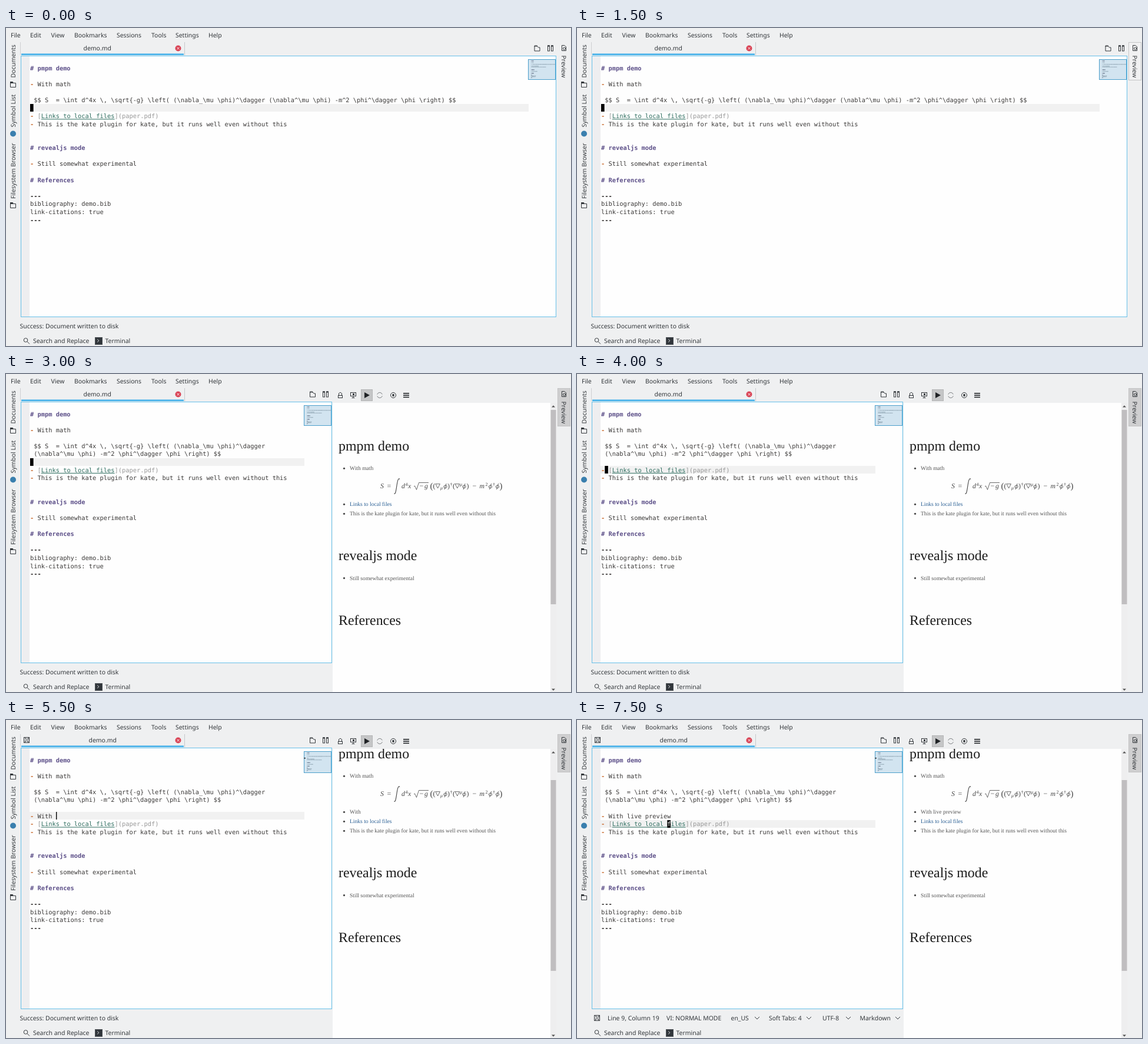
Animation, 960 px wide and 540 px high, one loop 8 s. Source, as an HTML page with a canvas:

```html
<!DOCTYPE html>
<html>
<head>
<meta charset="utf-8">
<style>
html, body { margin: 0; width: 100%; height: 100%; overflow: hidden; background: #eff0f1; }
canvas { display: block; }
</style>
</head>
<body>
<canvas id="stage" width="960" height="540"></canvas>
<script>
const ctx = document.getElementById('stage').getContext('2d');
const UI = '10.45px "Noto Sans", sans-serif';
const MONO = '10.37px "DejaVu Sans Mono", monospace';
const SERIF = '"Liberation Serif", serif';
const INK = '#33373b', BLUE = '#3daee9';
const CHAR = 6.243, ROW = 13.58, LEFT = 41, TOP = 68;
const TYPED = ['', '- ', '- With ', '- With live p', '- With live previe', '- With live preview'];
const SHOWN = ['With', 'With liv', 'With live prev', 'With live preview'];
const MATH_A = ' $$ S  = \\int d^4x \\, \\sqrt{-g} \\left( (\\nabla_\\mu \\phi)^\\dagger';
const MATH_B = '(\\nabla^\\mu \\phi) -m^2 \\phi^\\dagger \\phi \\right) $$';
const HEAD = ['# pmpm demo', '', '- With math', ''];
const TAIL = ['- [Links to local files](paper.pdf)',
  '- This is the kate plugin for kate, but it runs well even without this', '', '',
  '# revealjs mode', '', '- Still somewhat experimental', '', '# References', '',
  '---', 'bibliography: demo.bib', 'link-citations: true', '---'];

function text(s, x, y, color = INK, font = UI) {
  ctx.font = font;
  ctx.fillStyle = color;
  ctx.fillText(s, x, y);
}
function box(x, y, w, h, fill, stroke) {
  if (fill) { ctx.fillStyle = fill; ctx.fillRect(x, y, w, h); }
  if (stroke) { ctx.strokeStyle = stroke; ctx.lineWidth = 1; ctx.strokeRect(x + .5, y + .5, w - 1, h - 1); }
}
function line(points, color = INK, width = 1) {
  ctx.beginPath();
  for (let i = 0; i < points.length; i += 2) ctx.lineTo(points[i], points[i + 1]);
  ctx.strokeStyle = color;
  ctx.lineWidth = width;
  ctx.stroke();
}
function circle(x, y, r, fill, stroke) {
  ctx.beginPath();
  ctx.arc(x, y, r, 0, 7);
  if (fill) { ctx.fillStyle = fill; ctx.fill(); }
  if (stroke) { ctx.strokeStyle = stroke; ctx.lineWidth = 1; ctx.stroke(); }
}
function at(x, y, draw, angle = 0) {
  ctx.save();
  ctx.translate(x, y);
  ctx.rotate(angle);
  draw();
  ctx.restore();
}
const chevron = x => line([x - 4, 504, x, 508, x + 4, 504]);

const icons = {
  page() {
    line([0, -3.5, -4.5, -3.5, -4.5, 4.5, 4.5, 4.5, 4.5, -1.5, 2, -1.5, 0, -3.5, 0, -4.5, -4.5, -4.5, -4.5, -3]);
  },
  split() {
    box(-5, -5, 4, 10, null, INK);
    box(1, -5, 4, 10, null, INK);
    box(-5, -5, 4, 2, INK);
    box(1, -5, 4, 2, INK);
  },
  folder() {
    line([-4.5, -4.5, -.5, -4.5, .5, -2.5, 4.5, -2.5, 4.5, 4.5, -4.5, 4.5, -4.5, -5]);
    box(-4, -4, 4, 2, INK);
  },
  preview() {
    line([1, -4.5, -3.5, -4.5, -3.5, 4.5, 3.5, 4.5, 3.5, -2, 1, -4.5]);
    circle(.5, 1, 2, null, INK);
  },
  lock() {
    box(-4, 0, 8, 5, null, INK);
    line([-2.5, 0, -2.5, -3, -1, -4.5, 1, -4.5, 2.5, -3, 2.5, 0]);
  },
  screen() {
    box(-5, -5, 10, 7, null, INK);
    line([0, 2, 0, 5]);
    line([-2.5, 4.5, 2.5, 4.5]);
    box(-1, -3, 3, 3, INK);
  },
  play() {
    box(-10, -10, 20, 20, '#c5c6c7', '#b4b5b6');
    ctx.beginPath();
    ctx.moveTo(-4, -5); ctx.lineTo(5, 0); ctx.lineTo(-4, 5);
    ctx.fillStyle = '#202326';
    ctx.fill();
  },
  refresh() {
    for (const a of [.3, 3.44]) {
      ctx.beginPath();
      ctx.arc(0, 0, 4.5, a, a + 2.5);
      ctx.strokeStyle = '#777a7d';
      ctx.lineWidth = 1;
      ctx.stroke();
    }
  },
  stop() { circle(0, 0, 4.5, null, INK); box(-1.5, -2, 3, 4, INK); },
  menu() { for (const y of [-4, -.7, 2.6]) box(-5, y, 10, 1.6, '#202326'); },
  save() {
    box(-5, -5, 10, 10, null, INK);
    box(-2.5, -5, 6, 4, null, INK);
    box(-3, 1, 6, 4, null, INK);
  }
};
const icon = (name, x, y) => at(x, y, icons[name]);

function codeLine(s, row) {
  const y = TOP + row * ROW + 3.5;
  const put = (str, col, color = '#3a3837', bold = '') =>
    text(str, LEFT + col * CHAR, y, color, bold + MONO);
  if (s.startsWith('#')) put(s, 0, '#5c4f88', 'bold ');
  else if (s === '---') put(s, 0, '#1f1c1b', 'bold ');
  else if (s.startsWith('- ')) {
    put('-', 0, '#c8692c', 'bold ');
    const link = s.match(/\[(.*)\](.*)/);
    if (link) {
      const end = 3 + link[1].length;
      put('[', 2, '#979797');
      put(link[1], 3, '#2f6e60');
      box(LEFT + 3 * CHAR, y + 1.4, link[1].length * CHAR, 1, '#2f6e60');
      put(']' + link[2], end, '#979797');
    } else put(s.slice(2), 2);
  } else put(s, 0);
}

function minimap(x, rows, changed) {
  box(x, 53, 47, changed ? 37 : 35, '#d2e4f0', '#4d9fcb');
  rows.forEach((s, i) => {
    const y = 55.3 + i * 1.5;
    const strong = /^(#|---)/.test(s);
    ctx.fillStyle = strong ? '#37405a' : '#6f8290';
    for (let c = 0; c < s.length; c++)
      if (s[c] !== ' ') ctx.fillRect(x + 5.5 + c * .355, y, .3, strong ? 1.2 : .9);
  });
  if (changed) box(x, 64, 3, 1.5, '#30363b');
}

function editor(step, open) {
  const right = open ? 554 : 935;
  const mapX = right - 48;
  const inserted = step >= 9;
  const typed = inserted ? TYPED[Math.min(step - 9, 5)] : '';
  const math = open ? [MATH_A, ' ' + MATH_B] : [MATH_A + ' ' + MATH_B];
  const extra = inserted ? [typed] : [];
  const rows = [...HEAD, ...math, '', ...extra, ...TAIL];

  let row = open ? 6 : 5, col = 0;
  if (step >= 7) { row = 7; col = 1; }
  if (inserted) col = typed.length;
  if (step === 15) { row = 8; col = 18; }
  const insertMode = inserted && step < 15;

  box(25, 47, right - 25, 444, '#fefefe', step === 4 || step === 5 ? '#c3c5c7' : '#66bfe8');
  box(26, 48, 14, 442, '#eeeef0');
  const y = Math.round(TOP + row * ROW - 6.9);
  box(40, y, mapX - 39, 13, '#f1f1f1');
  rows.forEach(codeLine);

  const x = LEFT + col * CHAR;
  if (insertMode) box(Math.round(x), y, 1.4, 13, '#000');
  else {
    box(x, y, 5.6, 13, '#000');
    text((rows[row][col] || '').trim(), x, TOP + row * ROW + 3.5, '#fff', MONO);
  }
  minimap(mapX, ['# pmpm demo', '', '- With math', '', MATH_A + MATH_B, '', ...extra, ...TAIL], inserted);
}

function formula(y) {
  const color = '#444';
  const glyphs = (list, dy, size, style = 'italic ') => {
    for (const [s, x] of list) text(s, x, y + dy, color, style + size + 'px ' + SERIF);
  };
  const nabla = x => line([x, y - 7.3, x + 7.6, y - 7.3, x + 3.8, y, x, y - 7.3], color, .8);
  const phi = x => {
    ctx.beginPath();
    ctx.ellipse(x + 3, y - 2.6, 2.7, 2.4, -.3, 0, 7);
    ctx.strokeStyle = color;
    ctx.lineWidth = .9;
    ctx.stroke();
    line([x + 4.6, y - 8, x + 1.6, y + 2.3], color, .8);
  };
  glyphs([['S', 636], ['d', 672], ['x', 683], ['g', 711], ['m', 804.5]], 0, 11.8);
  glyphs([['=', 647.5], ['−', 702.5], ['−', 792.5]], 0, 12, '');
  glyphs([['(', 725.5], [')', 750], ['(', 759], [')', 782.5]], 0, 12, '');
  glyphs([['(', 720.5], [')', 838.5]], 1, 15, '');
  glyphs([['4', 678.5], ['†', 754.5], ['2', 814.5], ['†', 827]], -4.4, 8, '');
  glyphs([['μ', 738]], 2, 8);
  glyphs([['μ', 771]], -4.4, 8);
  nabla(729.8);
  nabla(763);
  [743.5, 775.5, 820, 832].forEach(phi);
  line([693, y - 3, 694.5, y - 4, 697.5, y + 2.5, 701.5, y - 9.5, 718, y - 9.5], color, .8);
  ctx.beginPath();
  ctx.moveTo(659.5, y + 9);
  ctx.bezierCurveTo(664, y + 13, 663.5, y - 21, 669, y - 15.5);
  ctx.strokeStyle = color;
  ctx.lineWidth = 1.1;
  ctx.stroke();
}

function preview(step) {
  const scrolled = step >= 11;
  const up = scrolled ? -65 : 0, shift = scrolled ? -49 : 0;
  const heading = (s, y) => text(s, 565, y, '#1c1c1c', '23.9px ' + SERIF);
  const item = (s, y, color = '#555') => {
    circle(574.5, y - 3, 1.6, '#444');
    text(s, 584, y, color, '9.58px ' + SERIF);
  };
  box(555, 49, 370, 491, '#fefefe');
  ctx.save();
  ctx.beginPath();
  ctx.rect(555, 49, 370, 491);
  ctx.clip();
  heading('pmpm demo', 130 + up);
  item('With math', 163.3 + up);
  formula(194 + up);
  if (scrolled) item(SHOWN[Math.min(step - 11, 3)], 159.3);
  item('Links to local files', 224.3 + shift, '#2a5f94');
  item('This is the kate plugin for kate, but it runs well even without this', 240.3 + shift);
  heading('revealjs mode', 316.3 + shift);
  item('Still somewhat experimental', 349.7 + shift);
  heading('References', 426 + shift);
  ctx.restore();

  box(925, 49, 10, 491, '#eeeeef');
  box(925.5, scrolled ? 102 : 61, 9, scrolled ? 324 : 330, '#c0bec0');
  for (const [y, d] of [[55, -1], [536, 1]]) {
    ctx.beginPath();
    ctx.moveTo(927, y - d * 1.5); ctx.lineTo(933, y - d * 1.5); ctx.lineTo(930, y + d * 1.8);
    ctx.fillStyle = '#555';
    ctx.fill();
  }
  ['lock', 'screen', 'play', 'refresh', 'stop', 'menu'].forEach((name, i) =>
    icon(name, Math.round(568 + i * 22.4), 36));
}

function sidebars(step) {
  for (const [s, y] of [['Documents', 84.5], ['Symbol List', 168.5], ['Filesystem Browser', 290]])
    at(16, y, () => text(s, 0, 0), -Math.PI / 2);
  icon('folder', 12, 96);
  circle(12, 179.5, 5, '#3a7fae');
  icon('folder', 12, 301);

  if (step === 3) box(937, 24, 22, 65, '#f1f1f2', '#c4c5c6');
  if (step === 4) box(937, 24, 22, 65, '#93cdea', '#7bc2e6');
  if (step > 4) box(937, 24, 22, 65, '#cfcfd0', '#c3c3c4');
  icon('preview', 948, 34);
  at(944, 46.5, () => text('Preview', 0, 0), Math.PI / 2);
}

function chrome(step, open) {
  const menu = { File: 8, Edit: 41, View: 76.5, Bookmarks: 116, Sessions: 188, Tools: 247, Settings: 288, Help: 344 };
  for (const s in menu) text(s, menu[s], 15.5);

  box(24, 24, 1, 22, '#cfd0d2');
  box(303, 24, 1, 22, '#c6c8ca');
  box(26, 43.5, 276, 2.5, BLUE);
  const changed = step >= 9;
  text('demo.md', changed ? 140.5 : 131.5, 38);
  if (changed) icon('save', 35, 34);
  circle(292.5, 34.5, 5, '#d94355');
  line([290.5, 32.5, 294.5, 36.5], '#fff');
  line([294.5, 32.5, 290.5, 36.5], '#fff');
  icon('page', open ? 521 : 902.5, 34.5);
  icon('split', open ? 543 : 925, 34.5);

  circle(33.5, 530, 3.3, null, INK);
  line([36, 532.5, 40, 536.5]);
  text('Search and Replace', 46, 535);
  box(151, 525, 13, 13, '#31363b', '#50555a');
  line([155, 528.5, 158, 531, 155, 533.5], '#c5c8ca');
  text('Terminal', 168.5, 535);

  if (step < 14) return text('Success: Document written to disk', 23.5, 509.5);
  const normal = step === 15;
  icon('save', 34, 506);
  text(normal ? 'Line 9, Column 19' : 'Line 8, Column 20', 52, 509.5);
  text(normal ? 'VI: NORMAL MODE' : 'VI: INSERT MODE', 152, 509.5);
  text('en_US', 261.5, 509.5);
  text('Soft Tabs: 4', 326, 509.5);
  text('UTF-8', 417, 509.5);
  text('Markdown', 480.5, 509.5);
  [306, 394, 461, 545].forEach(chevron);
}

function frame() {
  const step = Math.floor(performance.now() % 8000 / 500);
  const open = step >= 4;
  ctx.textRendering = 'geometricPrecision';
  box(0, 0, 960, 540, '#eff0f1');
  chrome(step, open);
  editor(step, open);
  if (open) preview(step);
  sidebars(step);
  requestAnimationFrame(frame);
}
frame();
</script>
</body>
</html>
```
